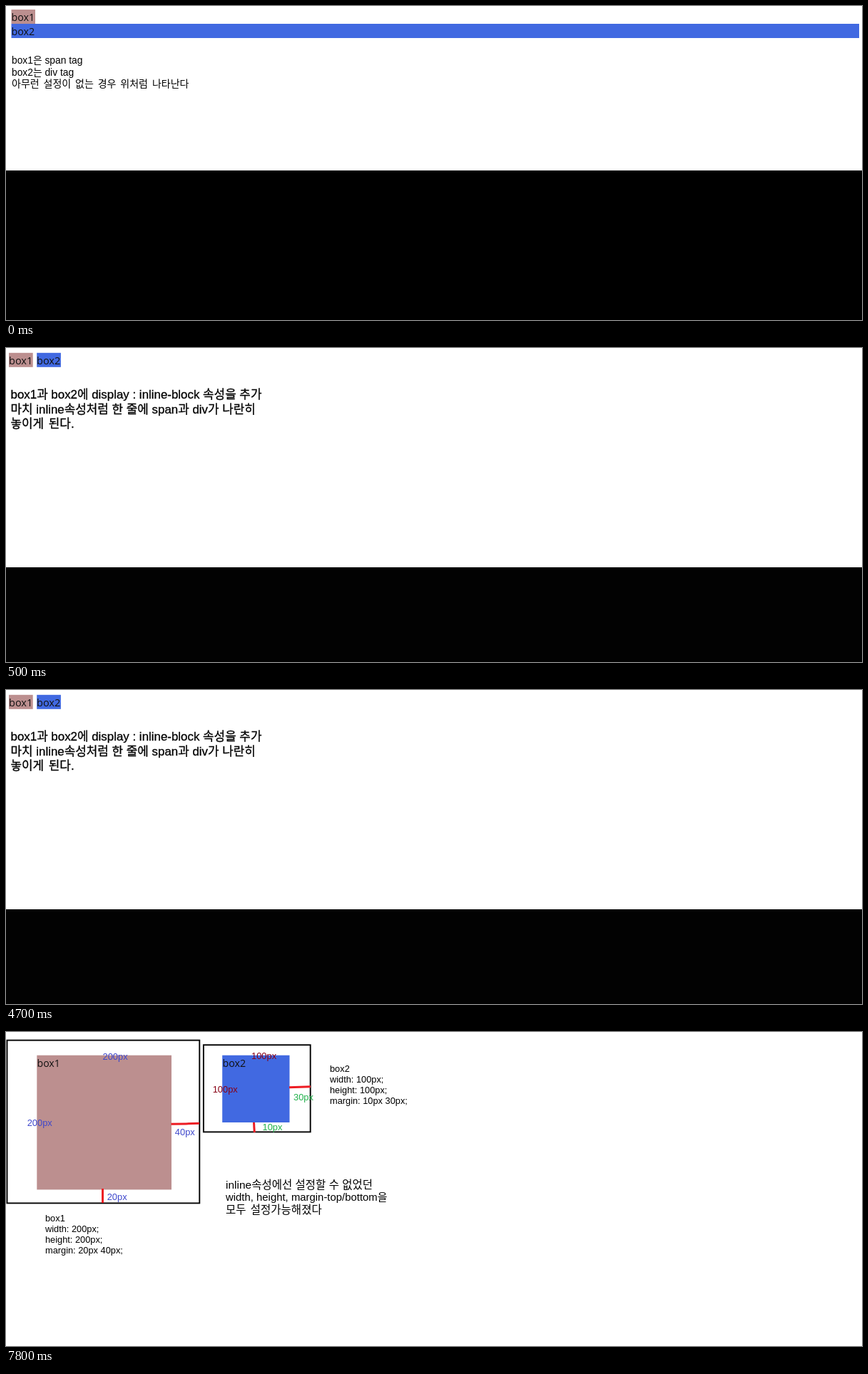
An HTML page for the animation above (8000 ms loop, 1200 by 441 pixels).

```html
<!DOCTYPE html>
<html lang="ko">
<head>
<meta charset="utf-8">
<title>inline-block</title>
<style>
  html, body { margin: 0; width: 100%; height: 100%; overflow: hidden; background: #fff; }
  svg { display: block; width: 100vw; height: 100vh; }
  text { font-family: "Liberation Sans", "Noto Sans CJK KR", "Noto Sans CJK", sans-serif; }
  .ui { font-family: "Open Sans", "Noto Sans", sans-serif; fill: #111; }
  .heavy { stroke: #000; stroke-width: .3px; }
</style>
</head>
<body>
<svg id="stage" viewBox="0 0 1200 441" preserveAspectRatio="none"></svg>
<script>
const LOOP = 8000;
const ROSE = '#bc8f8f', ROYAL = '#4169e1', DARK = '#020202';
const BLUE = '#3f48cc', WINE = '#880015', GREEN = '#22b14c', RED = '#ed1c24';

const rect = (x, y, w, h, fill) =>
  `<rect x="${x}" y="${y}" width="${w}" height="${h}" fill="${fill}"/>`;
const frame = (x, y, w, h) =>
  `<rect x="${x}" y="${y}" width="${w}" height="${h}" fill="none" stroke="#000" stroke-width="1.9"/>`;
const mark = d =>
  `<path d="${d}" fill="none" stroke="${RED}" stroke-width="3"/>`;
const text = (s, x, y, size, { fill = '#000', cls = '', gap = 0 } = {}) =>
  `<text x="${x}" y="${y}" font-size="${size}" fill="${fill}" class="${cls}" word-spacing="${gap}">${s}</text>`;
const name = (s, x, y, size) => text(s, x, y, size, { cls: 'ui' });
const label = (s, x, y, fill) => text(s, x, y, 12.9, { fill });
const rules = (lines, x, y) =>
  lines.map((s, i) => text(s, x, y + i * 15.2, 12.8)).join('');

const defaults = () =>
  rect(0, 231, 1200, 210, '#000') +
  rect(7.5, 5, 33.5, 20, ROSE) + rect(7.5, 25, 1188.5, 20, ROYAL) +
  name('box1', 7.5, 21, 14.3) + name('box2', 7.5, 41, 14.3) +
  text('box1은 span tag', 8, 81, 13.8) +
  text('box2는 div tag', 8, 97.5, 13.8) +
  text('아무런 설정이 없는 경우 위처럼 나타난다', 8, 114, 14, { gap: 2 });

const inlineBlock = () => {
  const heavy = { cls: 'heavy' };
  return rect(0, 308, 1200, 133, DARK) +
    rect(4, 6.8, 33.7, 20, ROSE) + rect(43.2, 6.8, 33.7, 20, ROYAL) +
    name('box1', 4, 23, 14.5) + name('box2', 43, 23, 14.5) +
    text('box1과 box2에 display : inline-block 속성을 추가', 6.5, 71, 16.9, heavy) +
    text('마치 inline속성처럼 한 줄에 span과 div가 나란히', 6.5, 91.5, 16.9, heavy) +
    text('놓이게 된다.', 6.5, 112, 16.9, { ...heavy, gap: 2 });
};

const sized = () =>
  rect(43.3, 32.7, 188.7, 188.7, ROSE) + rect(303.2, 32.7, 94.3, 94.3, ROYAL) +
  frame(1.5, 11.6, 269.8, 228.8) + frame(276.9, 18.2, 149.8, 122.2) +
  mark('M231.5 129.3L252 128.9L271 128.3') + mark('M135.5 220V240') +
  mark('M397 77.7L412 77.2L427 76.8') + mark('M347.5 127L348.3 141') +
  name('box1', 43.5, 49, 14.1) + name('box2', 303.5, 49, 14.3) +
  label('200px', 135.5, 38.8, BLUE) + label('200px', 29.7, 131.8, BLUE) +
  label('40px', 236.8, 145, BLUE) + label('20px', 141.7, 235.5, BLUE) +
  label('100px', 344, 38.3, WINE) + label('100px', 289.7, 85.2, WINE) +
  label('30px', 403, 96, GREEN) + label('10px', 359.5, 138, GREEN) +
  rules(['box1', 'width: 200px;', 'height: 200px;', 'margin: 20px 40px;'], 55, 265.7) +
  rules(['box2', 'width: 100px;', 'height: 100px;', 'margin: 10px 30px;'], 454, 55.7) +
  text('inline속성에선 설정할 수 없었던', 308, 219.5, 15.5) +
  text('width, height, margin-top/bottom을', 308, 237.3, 14.9) +
  text('모두 설정가능해졌다', 308, 254.8, 15.5, { gap: 2 });

const scenes = [[0, defaults], [500, inlineBlock], [7500, sized]];
const stage = document.getElementById('stage');
stage.innerHTML = rect(0, 0, 1200, 441, '#fff') +
  scenes.map(([, draw]) => `<g>${draw()}</g>`).join('');
const groups = [...stage.querySelectorAll('g')];

function show(time) {
  const t = time % LOOP;
  const current = scenes.filter(([start]) => t >= start).length - 1;
  groups.forEach((g, i) => g.setAttribute('display', i === current ? 'inline' : 'none'));
}

const begin = performance.now();
function tick() {
  show(performance.now() - begin);
  requestAnimationFrame(tick);
}
tick();
</script>
</body>
</html>
```
